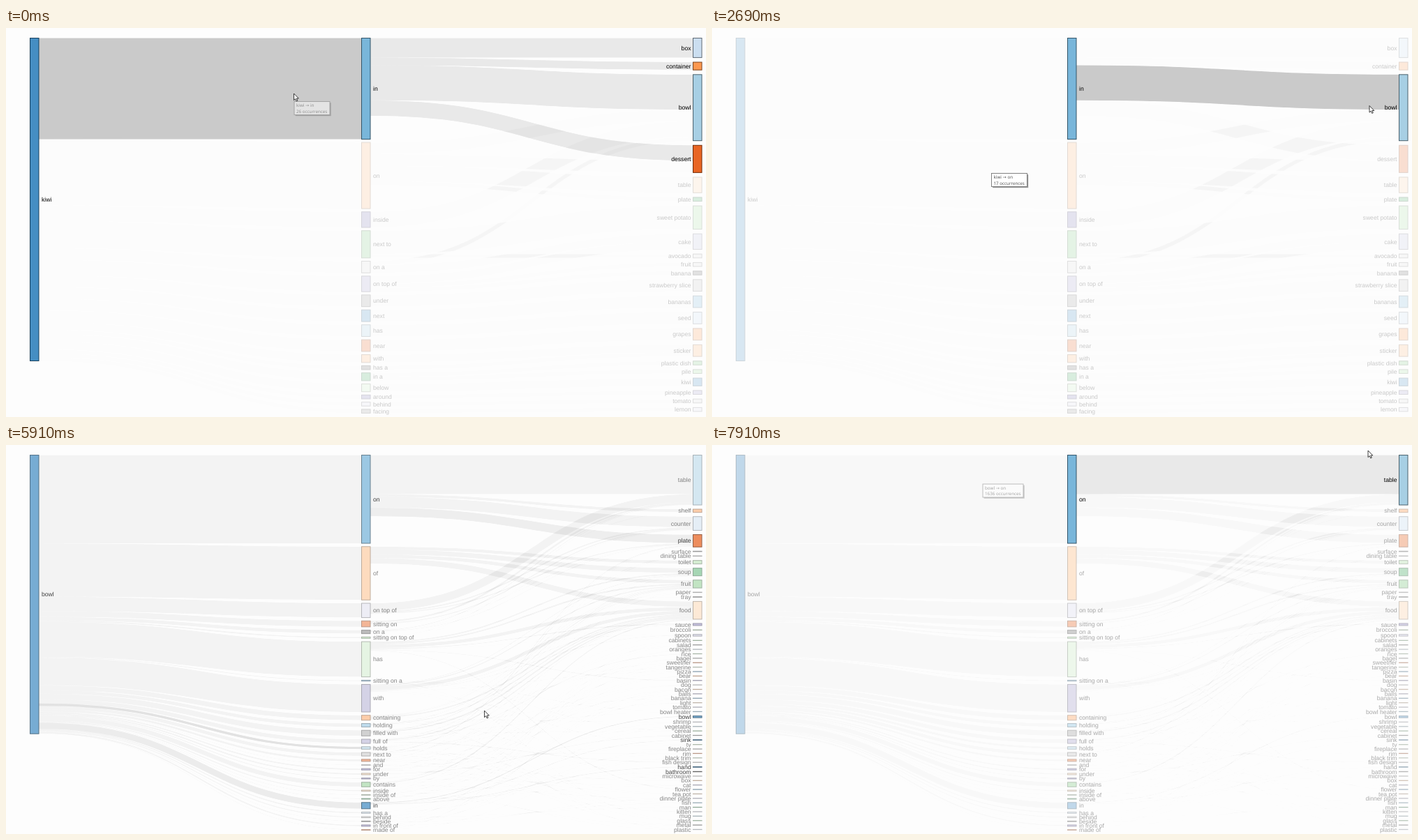
Recreate the animation shown at these times as an HTML page. Size 1003 by 558 pixels, loop 8000 ms.

```html
<!DOCTYPE html>
<html lang="en">
<head>
<meta charset="utf-8">
<title>Relation flow</title>
<style>
  html, body { margin: 0; width: 100%; height: 100%; overflow: hidden; background: #fdfdfd; }
  svg { display: block; width: 1003px; height: 558px; }
  text { font: 8.65px "Liberation Sans", Arial, sans-serif; text-rendering: geometricPrecision; }
  .tip text { font: 6.25px "Noto Sans", "DejaVu Sans", sans-serif; fill: #575757; }
</style>
</head>
<body>
<svg id="stage" viewBox="0 0 1003 558">
  <filter id="faint" filterUnits="userSpaceOnUse" x="0" y="0" width="1003" height="558" color-interpolation-filters="sRGB">
    <feComponentTransfer><feFuncA id="curve" type="table"/></feComponentTransfer>
  </filter>
</svg>
<script>
const LOOP = 8000, TOP = 14.5, WIDTH = 12.5, COLS = [34.5, 509.5, 984.5];
const PALETTE = ('3182bd 6baed6 9ecae1 c6dbef e6550d fd8d3c fdae6b fdd0a2 31a354 74c476 ' +
  'a1d99b c7e9c0 756bb1 9e9ac8 bcbddc dadaeb 636363 969696 bdbdbd d9d9d9').split(' ');

const stage = document.getElementById('stage');

// Nearly hides single dimmed links while keeping their crossings visible.
document.getElementById('curve').setAttribute('tableValues',
  Array.from({ length: 52 }, (_, i) => [0, .006, .032][i] ?? i / 51).join(' '));

function add(parent, tag, attrs, text) {
  const el = document.createElementNS('http://www.w3.org/2000/svg', tag);
  for (const k in attrs) el.setAttribute(k, attrs[k]);
  if (text) el.textContent = text;
  return parent.appendChild(el);
}

function darker(hex) {
  const c = [0, 2, 4].map(i => Math.round(parseInt(hex.slice(i, i + 2), 16) * .49));
  return `rgb(${c})`;
}

// "name size colour" items, stacked downwards
function column(spec, col, scale, gap) {
  let y = TOP;
  return spec.split(',').map((item, i) => {
    const m = item.match(/^(.+) ([\d.]+) (\w)$/);
    const h = (m ? +m[2] : .3) * scale;
    const color = PALETTE[m ? m[3].charCodeAt(0) - 97 : (i * 7 + 4) % 20];
    const node = { name: m ? m[1] : item, col, i, y, h, color, used: 0, fed: 0 };
    y += h + gap;
    return node;
  });
}

function drawNode(parent, n) {
  const x = COLS[n.col], right = n.col === 2;
  n.el = add(parent, 'g', {});
  add(n.el, 'rect', { x, y: n.y, width: WIDTH, height: n.h, fill: '#' + n.color,
    'fill-opacity': .9, stroke: darker(n.color) });
  add(n.el, 'text', { x: right ? x - 3 : x + WIDTH + 4, y: n.y + n.h / 2 + 3.1,
    'text-anchor': right ? 'end' : 'start' }, n.name);
}

function drawLink(parent, l) {
  const x0 = COLS[l.from.col] + WIDTH, x1 = COLS[l.to.col], xm = (x0 + x1) / 2;
  const y0 = l.from.y + l.from.used + l.w / 2, y1 = l.to.y + l.y1 + l.w / 2;
  l.from.used += l.w;
  l.el = add(parent, 'path', { d: `M${x0} ${y0}C${xm} ${y0} ${xm} ${y1} ${x1} ${y1}`,
    fill: 'none', stroke: '#000', 'stroke-width': l.w });
}

function diagram({ root, mid, right, links, scale, midGap, rightGap, strays }) {
  const g = add(stage, 'g', {});
  const mids = column(mid, 1, scale, midGap), rights = column(right, 2, scale, rightGap);
  const total = mids.reduce((s, n) => s + n.h, 0);
  const start = { name: root, col: 0, y: TOP, h: total, color: PALETTE[0], used: 0 };
  const list = [];
  for (const row of links.split(';')) {
    const [name, targets] = row.split(':');
    const from = mids.find(n => n.name === name);
    for (const t of targets.split(',')) {
      const [, to, w] = t.match(/^(.+) ([\d.]+)$/);
      list.push({ from, to: rights.find(n => n.name === to), w: w * scale });
    }
  }
  // thin threads for the rare targets
  if (strays) for (const to of rights) {
    if (to.i < 4 || to.h > 1 || list.some(l => l.to === to)) continue;
    for (const k of [7, 11]) {
      const from = mids[6 + (to.i * k) % (mids.length - 6)];
      if (from.name !== 'in') list.push({ from, to, w: .5 });
    }
  }
  list.sort((a, b) => a.from.i - b.from.i || a.to.i - b.to.i);
  for (const l of list) { l.y1 = l.to.fed; l.to.fed += l.w; }
  const all = mids.map(n => ({ from: start, to: n, w: n.h, y1: 0 })).concat(list);
  const lines = add(g, 'g', { filter: 'url(#faint)' });
  all.forEach(l => drawLink(lines, l));
  const nodes = [start, ...mids, ...rights];
  nodes.forEach(n => drawNode(g, n));
  return { g, nodes, links: all };
}

const kiwi = diagram({
  root: 'kiwi', scale: 5.578, midGap: 4.69, rightGap: 6.64,
  mid: 'in 26 b,on 17 g,inside 4 m,next to 7 j,on a 3 t,on top of 4 n,under 3 r,next 3 a,has 3 c,' +
    'near 3 e,with 2 g,has a 1 q,in a 2 i,below 2 l,around 1 m,behind 1 p,facing 1 r',
  right: 'box 5 d,container 2 f,bowl 17 c,dessert 7 e,table 4 h,plate 1 i,sweet potato 6 k,cake 4 o,' +
    'avocado 1 t,fruit 1 t,banana 1 q,strawberry slice 3 s,bananas 3 b,seed 3 d,grapes 3 f,sticker 3 g,' +
    'plastic dish 1 j,pile 1 k,kiwi 2 a,pineapple 1 n,tomato 1 t,lemon 1 p',
  links: 'in:box 5,container 2,bowl 9,dessert 4;on:bowl 3,dessert 3,table 4,plate 1;inside:bowl 4;' +
    'next to:sweet potato 6,avocado 1;on a:bowl 1,cake 2;on top of:cake 2,fruit 1,banana 1;' +
    'under:strawberry slice 3;next:bananas 3;has:seed 3;near:grapes 3;with:sticker 2;has a:sticker 1;' +
    'in a:plastic dish 1,pile 1;below:kiwi 2;around:pineapple 1;behind:tomato 1;facing:lemon 1'
});

const bowl = diagram({
  root: 'bowl', scale: 1, midGap: 4.77, rightGap: 6.08, strays: true,
  mid: 'on 126.5 b,of 76.5 g,on top of 20.5 p,sitting on 8.5 e,on a 5 q,sitting on top of 2 k,has 50.5 l,' +
    'sitting on a 1.3 a,with 39.5 n,containing 7 f,holding 5 b,filled with 8 r,full of 6 n,holds 3.5 c,' +
    'next to 5 s,near 3 e,and 0.8 t,for 2 m,under 2 h,by 1.3 m,contains 6.5 j,inside 1.6 h,inside of 0.9 l,' +
    'above 0.9 i,in 9 a,has a 1.8 d,behind 1.5 t,beside 0.8 q,in front of 2 m,made of 0.8 e',
  right: 'table 71.5 c,shelf 4.6 f,counter 19.7 d,plate 17.7 e,surface 0.6 q,dining table 0.5 s,toilet 5 k,' +
    'soup 11 i,fruit 11.3 j,paper 0.5 s,tray 0.6 q,food 25.5 h,sauce 3 m,broccoli 0.6 k,spoon 2.4 o,' +
    'cabinets,salad,oranges,rice,bagel,sweetner,tangerine,pizza 0.3 a,bear,basin,dog,bacon,balls,banana,' +
    'light,tomato,bowl heater,bowl 2.5 a,shrimp,vegetable,cereal,cabinet,sink 0.7 a,tv,fireplace,rim 0.3 e,' +
    'black trim,fish design,hand 0.8 a,bathroom 0.4 q,microwave,box,cat,flower,tea pot,dinner plate,fish,' +
    'man,kitten,mug,glass,metal,plastic',
  links: 'on:table 56,shelf 4,counter 15.3,plate 12.4;of:toilet 4.5,soup 7,fruit 5,food 8;' +
    'on top of:table 11.5,counter 2,plate 1.5,surface 0.4,tray 0.4;' +
    'sitting on:table 2.5,shelf 0.4,counter 1.4,plate 0.6;on a:table 1,counter 0.6,plate 0.8,tray 0.4;' +
    'sitting on top of:table 0.6,counter 0.4;has:soup 2,fruit 2.2,food 5,sauce 1.2,broccoli 0.4,spoon 0.5;' +
    'with:soup 1,fruit 1.5,food 5,sauce 0.8,spoon 0.8;containing:soup 0.6,fruit 0.8,food 2,sauce 0.4;' +
    'holding:fruit 0.8,food 1.2;filled with:soup 0.5,fruit 1,food 2;full of:fruit 0.8,food 1.5;' +
    'holds:fruit 0.5,food 0.8;next to:plate 1,spoon 0.5;near:plate 0.6,food 0.4;under:plate 0.4;' +
    'contains:soup 0.6,fruit 0.5,food 1.4;in:bowl 1.2,sink 0.7,hand 0.8,bathroom 0.4'
});

// Hover states: mid node, optional single target, hot root link, dim level
const IDLE = null;
const onBowlLink = { mid: 'on', hot: 'on', dim: .2 };
const viaIn = { mid: 'in', hot: 'holds', dim: .2 };
const plateSoft = { mid: 'on', to: 'plate', dim: .6 };
const tableSoft = { mid: 'on', to: 'table', dim: .33 };
const kiwiIn = { mid: 'in', hot: 'in', dim: .2 };
const kiwiOn = { mid: 'on', hot: 'on', dim: .2 };
const inBowl = { mid: 'in', to: 'bowl', hotTo: true, dim: .2 };

const HOVER = [
  [0, kiwiIn], [205, kiwiIn], [500, kiwiOn], [2290, kiwiOn], [2610, inBowl], [2700, inBowl], [3460, IDLE],
  [5400, IDLE], [5520, plateSoft], [5700, plateSoft], [6150, viaIn], [6380, viaIn], [6525, IDLE],
  [6710, onBowlLink], [7690, onBowlLink], [7910, tableSoft], [LOOP, tableSoft]
];
const POINTER = [
  [0, 412.5, 94], [60, 412, 102], [400, 400, 197], [1800, 400, 197], [1900, 409, 198], [1960, 407, 197.5],
  [2140, 430, 195], [2610, 942, 111.5], [2690, 942, 111.5], [2870, 975, 120], [3240, 1006, 150],
  [5059, 1006, 150], [5060, 991, 101], [5310, 986, 147], [5520, 955, 190], [6000, 560, 470],
  [6300, 340, 420], [6470, 365, 90], [6600, 385, 50], [6710, 388, 45], [7500, 388, 45],
  [7590, 560, 26], [7680, 741, 11.5], [7760, 840, 8], [7910, 940, 8], [LOOP, 940, 8]
];
const TIPS = [
  { x: 413, y: 105.5, w: 51, rows: ['kiwi → in', '26 occurrences'], fade: [[0, .5], [59, .5], [60, 1], [959, 1], [960, 0]] },
  { x: 400.5, y: 208.5, w: 51, rows: ['kiwi → on', '17 occurrences'], fade: [[959, 0], [960, 1], [2690, 1], [2870, 0]] },
  { x: 388, y: 56, w: 58, rows: ['bowl → on', '1636 occurrences'], fade: [[7020, 0], [7220, 1], [7760, 1], [7910, .5]] }
];
// Repaint bursts: first, last, count
const BURSTS = [
  [0, 0, 1], [60, 570, 8], [960, 960, 1], [1900, 1960, 2], [2140, 2690, 8], [2790, 2870, 2], [2950, 3530, 9],
  [5060, 5060, 1], [5310, 5310, 1], [5450, 5520, 2], [5660, 6410, 9], [6470, 6600, 2], [6710, 6710, 1],
  [7080, 7220, 3], [7590, 7680, 2], [7760, 7910, 3]
];
const STEPS = BURSTS.flatMap(([a, b, n]) => Array.from({ length: n }, (_, i) => a + (n > 1 ? (b - a) * i / (n - 1) : 0)));

for (const tip of TIPS) {
  tip.el = add(stage, 'g', { class: 'tip', transform: `translate(${tip.x} ${tip.y})` });
  add(tip.el, 'rect', { x: 1.7, y: 1.7, width: tip.w, height: 19, fill: '#000', opacity: .4 });
  add(tip.el, 'rect', { width: tip.w, height: 19, fill: '#fff', stroke: '#767676', 'stroke-width': .9 });
  tip.rows.forEach((s, i) => add(tip.el, 'text', { x: 3, y: 7.6 + i * 8.7 }, s));
}
const pointer = add(stage, 'path', { d: 'M0 0V9.6l2.2-2 1.5 3.3 1.6-.7-1.5-3.2h3z', fill: '#fff', stroke: '#000', 'stroke-width': .75 });

const mix = (a, b, p) => a + (b - a) * p;

function between(keys, t) {
  const last = keys.length - 1;
  if (t <= keys[0][0]) return [keys[0], keys[0], 0];
  if (t >= keys[last][0]) return [keys[last], keys[last], 0];
  const i = keys.findIndex(k => k[0] > t), a = keys[i - 1], b = keys[i];
  return [a, b, (t - a[0]) / (b[0] - a[0])];
}

function track(keys, t, k = 1) {
  const [a, b, p] = between(keys, t);
  return mix(a[k], b[k], p);
}

function linkAlpha(l, s) {
  if (!s) return .08;
  if (l.from.col === 0) {
    if (s.hot === l.to.name) return .2;
    return l.to.name === s.mid && !s.to ? .08 : s.dim * .1;
  }
  if (l.from.name !== s.mid || (s.to && l.to.name !== s.to)) return s.dim * .1;
  return s.hotTo ? .2 : .08;
}

function nodeAlpha(n, s, links) {
  if (!s) return 1;
  let lit;
  if (n.col === 0) lit = !s.to;
  else if (n.col === 1) lit = n.name === s.mid;
  else lit = s.to ? n.name === s.to : links.some(l => l.to === n && l.from.name === s.mid);
  return lit ? 1 : s.dim;
}

function paint(now) {
  const raw = now % LOOP, t = STEPS.findLast(s => s <= raw + .01);
  const view = t < 5060 ? kiwi : bowl;
  kiwi.g.style.display = view === kiwi ? '' : 'none';
  bowl.g.style.display = view === bowl ? '' : 'none';
  const [a, b, p] = between(HOVER, t);
  for (const l of view.links) l.el.setAttribute('stroke-opacity', mix(linkAlpha(l, a[1]), linkAlpha(l, b[1]), p));
  for (const n of view.nodes) n.el.setAttribute('opacity', mix(nodeAlpha(n, a[1], view.links), nodeAlpha(n, b[1], view.links), p));
  for (const tip of TIPS) tip.el.setAttribute('opacity', track(tip.fade, t));
  pointer.setAttribute('transform', `translate(${track(POINTER, t)} ${track(POINTER, t, 2)})`);
}

const began = performance.now();
function tick() {
  paint(performance.now() - began);
  requestAnimationFrame(tick);
}
tick();
</script>
</body>
</html>
```
